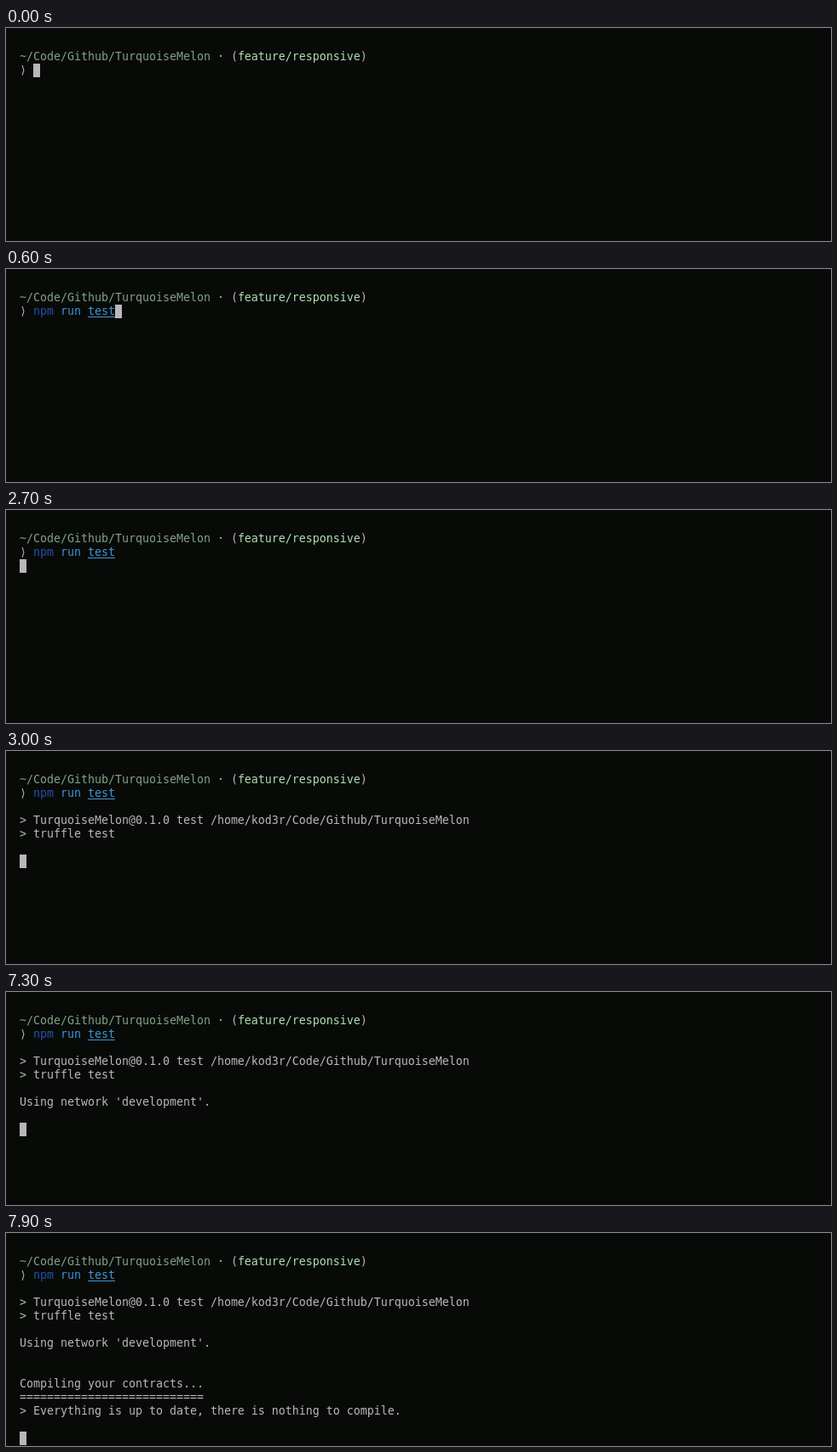
Recreate the animation shown at these times as an HTML page. Size 968x251 px, loop 8 s.

```html
<!DOCTYPE html>
<html lang="en">
<head>
<meta charset="utf-8">
<title>Terminal test run</title>
<style>
  html, body { margin: 0; width: 100%; height: 100%; overflow: hidden; background: #080a08; }
  #screen { position: absolute; left: 0; top: 0; width: 968px; height: 251px; overflow: hidden; }
  .row {
    position: absolute;
    font: 13.29px/15px "DejaVu Sans Mono", monospace;
    font-variant-ligatures: none;
    white-space: pre;
    color: #b8b8b8;
  }
  .path { color: #80a285; }
  .branch { color: #aee0b2; }
  .cmd { color: #1f54a8; }
  .arg { color: #3d92d8; }
  .link {
    color: #3f96d2;
    text-decoration: underline 1px;
    text-underline-offset: 2px;
    text-decoration-skip-ink: none;
  }
  #cursor { position: absolute; left: 0; top: 0; width: 8px; height: 16px; background: #bab6ba; }
</style>
</head>
<body>
<div id="screen"><div id="cursor"></div></div>
<script>
const LOOP = 8000;
const CELL = { w: 8, h: 16, left: 16, top: 26 };
const screen_ = document.getElementById('screen');
const cursor = document.getElementById('cursor');
const x = col => CELL.left + col * CELL.w;
const y = row => CELL.top + row * CELL.h;

// [time, row, column, ...[text, class]]
const lines = [
  [0, 0, 0, ['~/Code/Github/TurquoiseMelon', 'path'], [' · ('], ['feature/responsive', 'branch'], [')']],
  [0, 1, 0, ['⟩']],
  [600, 1, 2, ['npm', 'cmd'], [' run ', 'arg'], ['test', 'link']],
  [3000, 3, 0, ['> TurquoiseMelon@0.1.0 test /home/kod3r/Code/Github/TurquoiseMelon']],
  [3000, 4, 0, ['> truffle test']],
  [7300, 6, 0, ["Using network 'development'."]],
  [7400, 9, 0, ['Compiling your contracts...']],
  [7400, 10, 0, ['='.repeat(27)]],
  [7900, 11, 0, ['> Everything is up to date, there is nothing to compile.']],
];

// [time, row, column]
const cursorStops = [
  [0, 1, 2], [600, 1, 14], [2700, 2, 0], [3000, 6, 0],
  [7300, 8, 0], [7400, 11, 0], [7900, 13, 0],
];

function playSteps(element, property, steps) {
  const frames = steps.map(([time, value]) =>
    ({ offset: time / LOOP, [property]: value, easing: 'step-end' }));
  frames.push({ offset: 1, [property]: steps[steps.length - 1][1] });
  element.animate(frames, { duration: LOOP, iterations: Infinity });
}

for (const [time, row, col, ...parts] of lines) {
  const line = document.createElement('div');
  line.className = 'row';
  line.style.left = x(col) + 'px';
  line.style.top = y(row) + 'px';
  for (const [text, style = ''] of parts) {
    const span = document.createElement('span');
    span.className = style;
    span.textContent = text;
    line.append(span);
  }
  screen_.insertBefore(line, cursor);
  if (time) playSteps(line, 'opacity', [[0, 0], [time, 1]]);
}

playSteps(cursor, 'transform', cursorStops.map(([time, row, col]) =>
  [time, `translate(${x(col)}px, ${y(row)}px)`]));
</script>
</body>
</html>
```
